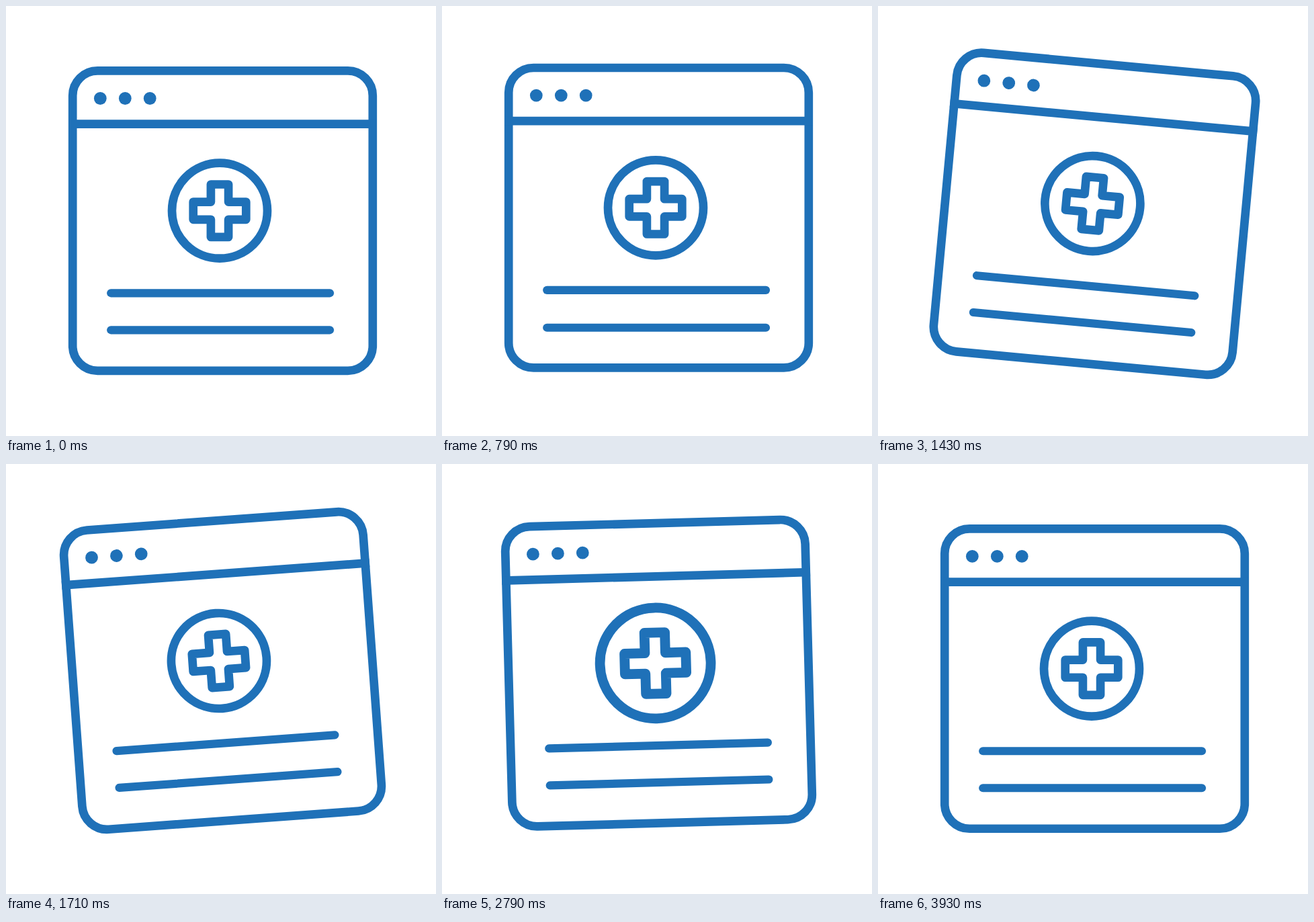
Recreate the animation shown at these times as an HTML page. Size 640 px wide and 640 px high, loop 4000 ms.

```html
<!DOCTYPE html>
<html lang="en">
<head>
<meta charset="utf-8">
<title>Medical web page icon</title>
<style>
  html, body { margin: 0; width: 100%; height: 100%; overflow: hidden; background: #fff; }
  svg { display: block; width: 100vw; height: 100vh; }
  .stroke { fill: none; stroke: #1f71b8; stroke-width: 12.7; stroke-linecap: round; stroke-linejoin: round; }
  .dots { fill: #1f71b8; }
</style>
</head>
<body>
<svg viewBox="0 0 640 640">
  <g id="page">
    <g class="dots">
      <circle cx="140.3" cy="137.5" r="9.4"/>
      <circle cx="177.3" cy="137.5" r="9.4"/>
      <circle cx="214.2" cy="137.5" r="9.4"/>
    </g>
    <g class="stroke">
      <rect x="99.2" y="96.4" width="446.6" height="446.4" rx="37"/>
      <path d="M93 175.6H552" stroke-linecap="butt"/>
      <path d="M156.2 427.3H482" stroke-width="12.2"/>
      <path id="lowerLine" d="M156.2 482.3H482" stroke-width="12.2"/>
      <g id="badge">
        <circle r="71"/>
        <path d="M-13.1 -39.2h26.2v26.1h26.2v26.2h-26.2v26.1h-26.2v-26.1h-26.2v-26.2h26.2z"/>
      </g>
    </g>
  </g>
</svg>
<script>
  const LOOP = 4000;
  const page = document.getElementById('page');
  const badge = document.getElementById('badge');
  const lowerLine = document.getElementById('lowerLine');

  // Keyframes are [ms, value] pairs.
  const lift = [[0, 0], [2000, -12.8], [4000, 0]];
  const swing = [[1045, 0], [1380, 5.8], [1765, -4.75], [2210, 3.8], [2640, -2.8], [3060, 1.4], [3450, 0]];
  const pulse = [[0, 1], [345, 1.2], [710, 1], [2330, 1], [2690, 1.2], [3050, 1]];
  const drop = [[0, 0], [430, 12.8], [860, 0]];

  const ease = u => u * u * (3 - 2 * u);

  function valueAt(keys, t) {
    if (t <= keys[0][0]) return keys[0][1];
    for (let i = 1; i < keys.length; i++) {
      const [t0, a] = keys[i - 1], [t1, b] = keys[i];
      if (t < t1) return a + (b - a) * ease((t - t0) / (t1 - t0));
    }
    return keys[keys.length - 1][1];
  }

  function draw() {
    const t = performance.now() % LOOP;
    page.setAttribute('transform',
      `translate(0 ${valueAt(lift, t)}) rotate(${valueAt(swing, t)} 322.5 319.5)`);
    badge.setAttribute('transform', `translate(318 304.7) scale(${valueAt(pulse, t)})`);
    lowerLine.setAttribute('transform', `translate(0 ${valueAt(drop, t)})`);
    requestAnimationFrame(draw);
  }
  draw();
</script>
</body>
</html>
```
